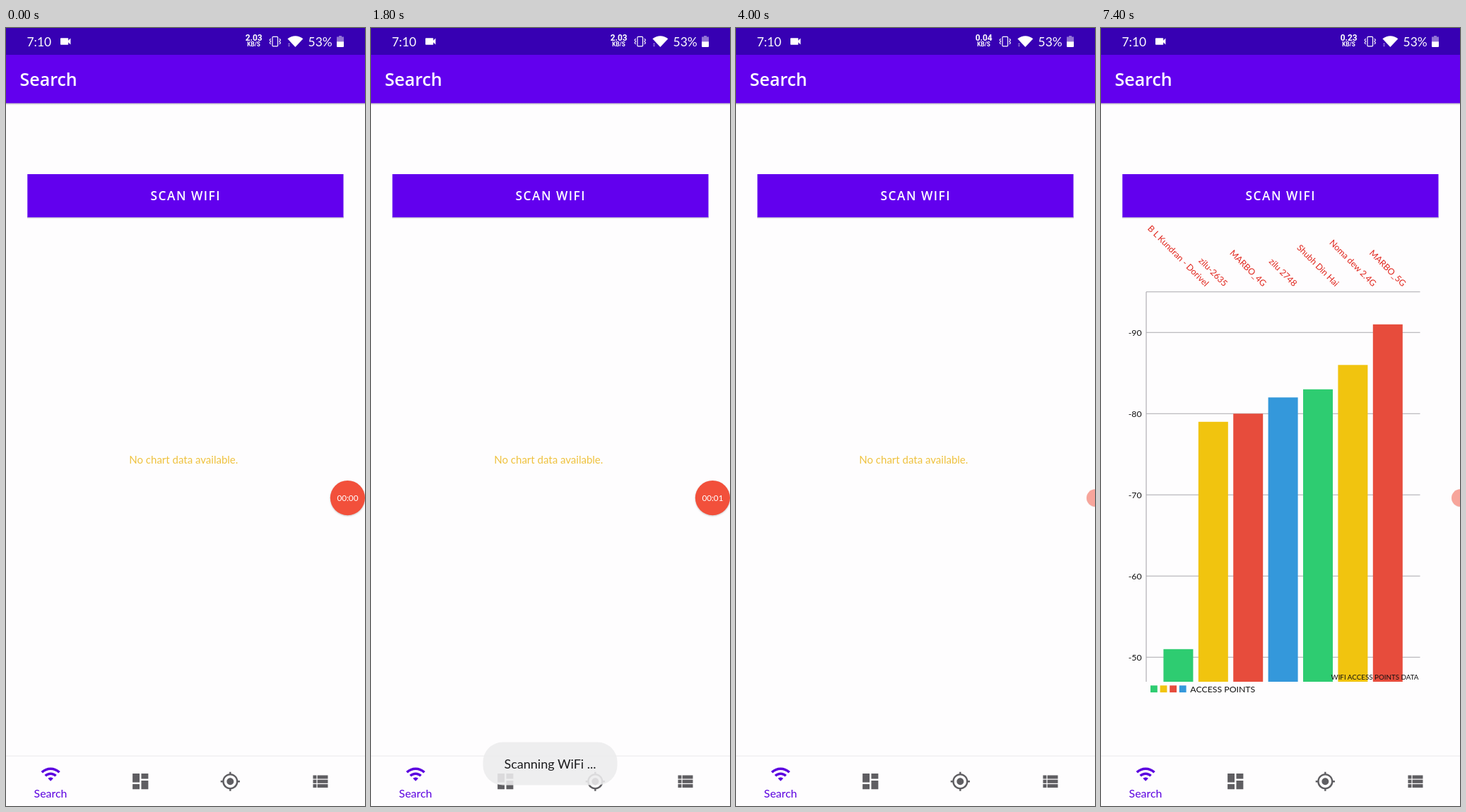
These frames come from a looping animation (508x1102 px, 8 s). An HTML page:

```html
<!DOCTYPE html>
<html lang="en">
<head>
<meta charset="utf-8">
<title>Search</title>
<style>
  html, body { margin: 0; width: 100%; height: 100%; overflow: hidden; background: #fefdfe; }
  svg { display: block; width: 508px; height: 1102px; font-family: Lato, "Open Sans", sans-serif; }
  .semi { font-family: "Open Sans", "Noto Sans", sans-serif; font-weight: 600; fill: #fff; }
  .net { font-family: Roboto, sans-serif; font-weight: 700; text-anchor: middle; fill: #fff; }
  .mid { text-anchor: middle; }
  .end { text-anchor: end; }
  #bubble { filter: drop-shadow(0 1px 1px rgba(0, 0, 0, .22)); }
</style>
</head>
<body>
<svg viewBox="0 0 508 1102">
  <defs>
    <linearGradient id="shade" x1="0" y1="0" x2="0" y2="1">
      <stop offset="0" stop-color="#000" stop-opacity=".26"/>
      <stop offset="1" stop-color="#000" stop-opacity="0"/>
    </linearGradient>
  </defs>
  <rect width="508" height="1102" fill="#fefdfe"/>

  <!-- app bar -->
  <rect y="106" width="508" height="3.5" fill="url(#shade)"/>
  <rect y="37" width="508" height="69.5" fill="#6200ee"/>
  <text class="semi" x="19.5" y="82" font-size="25">Search</text>

  <!-- status bar -->
  <rect width="508" height="38" fill="#3700b3"/>
  <g fill="#fff">
    <text x="29.5" y="25.5" font-size="17.4">7:10</text>
    <path transform="translate(74.6 9.4) scale(.8)" d="M17 10.5V7c0-.55-.45-1-1-1H4c-.55 0-1 .45-1 1v10c0 .55.45 1 1 1h12c.55 0 1-.45 1-1v-3.5l4 4v-11l-4 4z"/>
    <text class="net" id="speed" x="350.7" y="18.3" font-size="11.9"></text>
    <text class="net" x="350.5" y="26.4" font-size="8.2">KB/S</text>
    <g fill="none" stroke="#fff" stroke-width="1.2">
      <rect x="377" y="12.4" width="7.6" height="13.4" rx="1"/>
      <path d="M374.6 15l-1.4 2 1.4 2-1.4 2 1.4 2M387 15l1.4 2-1.4 2 1.4 2-1.4 2"/>
    </g>
    <path d="M409.4 27L398.4 15.2Q409.4 7.4 420.4 15.2Z"/>
    <path d="M399 23.2l1.5-2 1.5 2zM399 24.4l1.5 2 1.5-2z" opacity=".6"/>
    <text x="427.6" y="25.5" font-size="17.4">53%</text>
    <path d="M471 11h4v1.5h3v7H468v-7h3z" opacity=".45"/>
    <path d="M468 19.2h10v6.8q0 1-1 1h-8q-1 0-1-1z"/>
  </g>

  <!-- button -->
  <rect x="30" y="267.5" width="448" height="3" fill="url(#shade)"/>
  <rect x="30.3" y="207" width="447.2" height="61.2" fill="#6200ee"/>
  <text class="semi" x="204.5" y="244.4" font-size="17.3" letter-spacing="1.5">SCAN WIFI</text>

  <text id="empty" class="mid" x="251.3" y="617.4" font-size="15" fill="#efc23e">No chart data available.</text>
  <g id="chart"></g>

  <!-- bottom navigation -->
  <rect y="1031" width="508" height="71" fill="#fefdfe"/>
  <rect y="1030.5" width="508" height="1.5" fill="#f1f0f2"/>
  <g fill="#5f5e62">
    <path fill="#5b00e0" transform="translate(48.3 1042) scale(1.236)" d="M1 9l2 2c4.97-4.97 13.03-4.97 18 0l2-2C16.93 2.93 7.08 2.93 1 9zm8 8l3 3 3-3c-1.65-1.66-4.34-1.66-6 0zm-4-4l2 2c2.76-2.76 7.24-2.76 10 0l2-2C15.14 9.14 8.87 9.14 5 13z"/>
    <path transform="translate(175.4 1052.4) scale(1.236)" d="M3 13h8V3H3v10zm0 8h8v-6H3v6zm10 0h8V11h-8v10zm0-18v6h8V3h-8z"/>
    <path transform="translate(302.5 1052.4) scale(1.236)" d="M12 8c-2.21 0-4 1.79-4 4s1.79 4 4 4 4-1.79 4-4-1.79-4-4-4zm8.94 3c-.46-4.17-3.77-7.48-7.94-7.94V1h-2v2.06C6.83 3.52 3.52 6.83 3.06 11H1v2h2.06c.46 4.17 3.77 7.48 7.94 7.94V23h2v-2.06c4.17-.46 7.48-3.77 7.94-7.94H23v-2h-2.06zM12 19c-3.87 0-7-3.13-7-7s3.13-7 7-7 7 3.13 7 7-3.13 7-7 7z"/>
    <path transform="translate(429.5 1052.4) scale(1.236)" d="M4 14h4v-4H4v4zm0 5h4v-4H4v4zM4 9h4V5H4v4zm5 5h12v-4H9v4zm0 5h12v-4H9v4zM9 5v4h12V5H9z"/>
  </g>
  <text class="mid" x="63" y="1090" font-size="15.9" fill="#5b00e0">Search</text>

  <g id="toast">
    <rect x="158.5" y="1011.5" width="190" height="61" rx="28" fill="#ececed" fill-opacity=".88"/>
    <text class="mid" x="253.5" y="1049" font-size="18" fill="#1c1c1e">Scanning WiFi ...</text>
  </g>

  <g id="bubble">
    <circle r="24.6" fill="#f2503b"/>
    <text id="clock" class="mid" y="4.4" font-size="11.7" fill="#fff"></text>
  </g>
</svg>
<script>
const LOOP = 8000;
const $ = id => document.getElementById(id);

function add(parent, tag, attrs, text) {
  const el = document.createElementNS("http://www.w3.org/2000/svg", tag);
  for (const k in attrs) el.setAttribute(k, attrs[k]);
  if (text) el.textContent = text;
  parent.appendChild(el);
  return el;
}

// Chart
const GREEN = "#2ecc71", YELLOW = "#f1c40f", RED = "#e74c3c", BLUE = "#3498db";
const points = [
  ["B L Kundran - Dorivel", 51, GREEN],
  ["zilu-2635", 79, YELLOW],
  ["MARBO_4G", 80, RED],
  ["zilu 2748", 82, BLUE],
  ["Shubh Din Hai", 83, GREEN],
  ["Noma dew 2.4G", 86, YELLOW],
  ["MARBO_5G", 91, RED]
];
const BOTTOM = 926;
const levelY = v => 431.3 + (90 - v) * 11.5;

function buildChart(g) {
  const line = (x1, y1, x2, y2) =>
    add(g, "line", { x1, y1, x2, y2, stroke: "#a9a8ac", "stroke-width": 1.1 });

  for (const v of [95, 90, 80, 70, 60, 50]) {
    const y = levelY(v);
    line(64, y, 451.5, y);
    if (v < 95) add(g, "text", { x: 57.6, y: y + 4.2, class: "end", "font-size": 12.3, fill: "#111" }, "-" + v);
  }
  line(64, levelY(95), 64, BOTTOM);

  points.forEach(([name, v, fill], i) => {
    const x = 88.4 + 49.4 * i, y = levelY(v);
    add(g, "rect", { x, y, width: 42, height: BOTTOM - y, fill });
    const label = add(g, "text", { class: "mid", y: 4.3, "font-size": 12.3, fill: "#e0251c" }, name);
    // slanted labels share one bottom edge
    const half = (label.getComputedTextLength() + 9) / (2 * Math.SQRT2);
    label.setAttribute("transform", `translate(${x + 21} ${367 - half}) rotate(45)`);
  });

  [GREEN, YELLOW, RED, BLUE].forEach((fill, i) =>
    add(g, "rect", { x: 70 + 13.6 * i, y: 931.3, width: 9.8, height: 9.8, fill }));
  add(g, "text", { x: 126.3, y: 940.8, "font-size": 12.3, fill: "#111" }, "ACCESS POINTS");
  add(g, "text", { x: 449.5, y: 923.4, class: "end", "font-size": 9.8, fill: "#111" }, "WIFI ACCESS POINTS DATA");
}

// Steps: [start ms, value]
const speed = [[0, "2.03"], [2600, "0.13"], [3000, "0.04"], [5600, "0.23"]];
const toast = [[0, 0], [1400, .4], [1600, .85], [1800, 1], [3400, .87], [3600, .4], [3800, 0]];
// bubble: x, scale, opacity
const bubble = [[0, [483.4, 1, 1]], [2200, [493.2, .8, 1]], [2400, [493.2, .8, .66]], [4000, [508.3, .5, .5]]];

function at(steps, t) {
  let value;
  for (const [start, v] of steps) if (t >= start) value = v;
  return value;
}

function draw(t) {
  $("speed").textContent = at(speed, t);
  $("toast").setAttribute("opacity", at(toast, t));

  const [x, scale, opacity] = at(bubble, t);
  $("bubble").setAttribute("transform", `translate(${x} 665.6) scale(${scale})`);
  $("bubble").setAttribute("opacity", opacity);
  $("clock").textContent = t < 4000 ? "00:0" + Math.floor(t / 1000) : "";

  const ready = t >= 7200;
  $("chart").setAttribute("visibility", ready ? "visible" : "hidden");
  $("empty").setAttribute("visibility", ready ? "hidden" : "visible");
}

buildChart($("chart"));
const begin = performance.now();
function tick() {
  draw((performance.now() - begin) % LOOP);
  requestAnimationFrame(tick);
}
tick();
</script>
</body>
</html>
```
